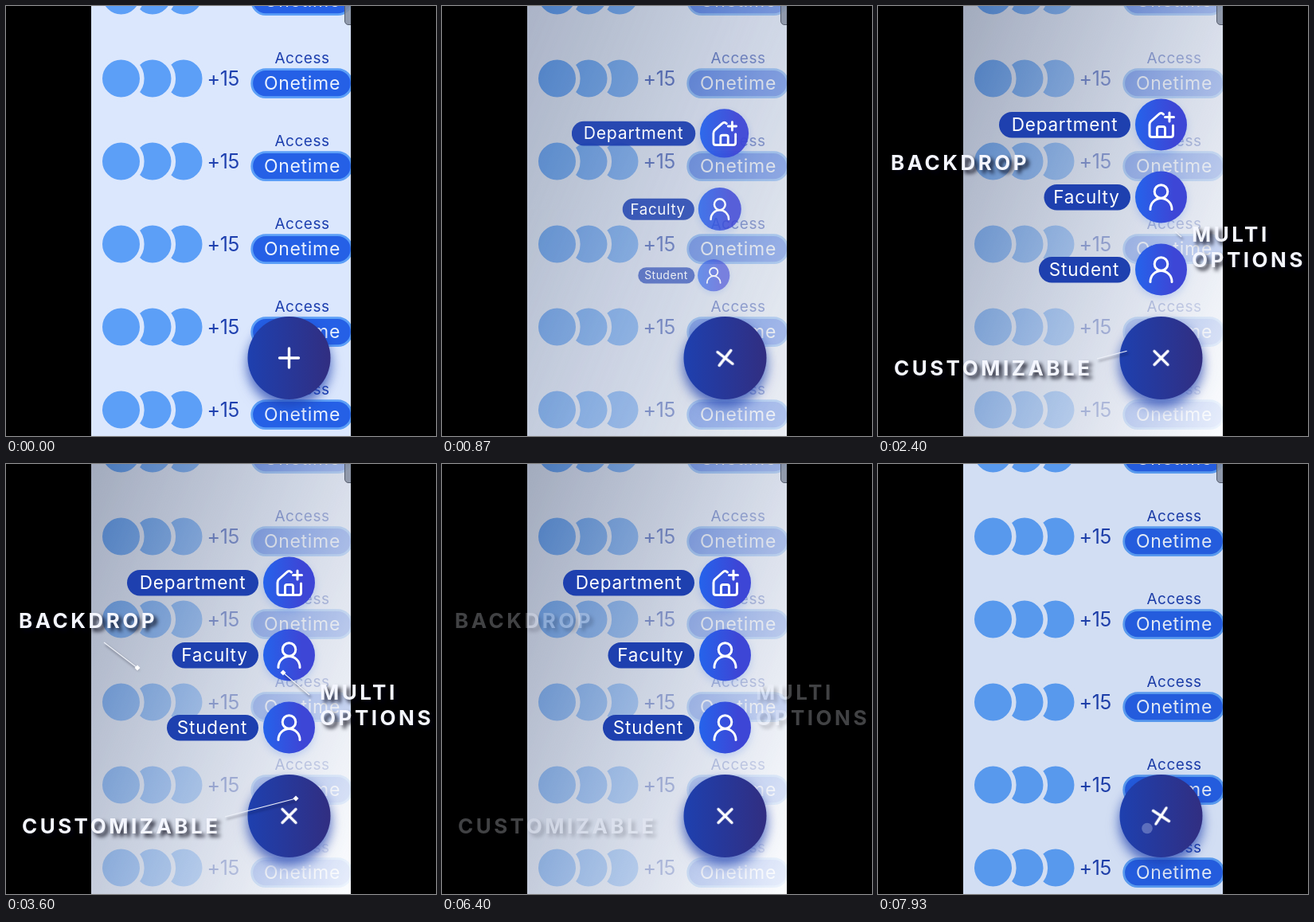
Recreate the animation shown at these times as an HTML page. Size 540 px wide and 540 px high, loop 8 s.

```html
<!DOCTYPE html>
<html lang="en">
<head>
<meta charset="utf-8">
<title>Floating action menu</title>
<style>
html, body { margin: 0; width: 100%; height: 100%; overflow: hidden; background: #000; }
.stage { position: relative; width: 540px; height: 540px; overflow: hidden; background: #000; }
.stage > svg { position: absolute; left: 0; top: 0; display: block; }
.shade { position: absolute; left: 107px; top: 0; width: 326px; height: 540px; }
.blend { background: linear-gradient(112deg, rgba(10,10,20,.27), rgba(198,202,212,.62) 50%, rgba(255,255,255,.9)); }
.dim { background: #000; }

text { font-family: Inter, "Open Sans", sans-serif; }
.ink { fill: #1e40af; }
.count { font-size: 25px; letter-spacing: -.3px; }
.access { font-size: 19px; letter-spacing: .5px; }
.once { font-size: 23px; letter-spacing: .7px; fill: #eaf2ff; }
.tag text { font-size: 22.5px; letter-spacing: .8px; fill: #fff; }
.tag rect { fill: #1e40af; }
.icon { fill: none; stroke: #fff; stroke-width: 3; stroke-linecap: round; stroke-linejoin: round; }
.disc { filter: drop-shadow(0 4px 5px rgba(37,99,235,.2)); }
.fab { filter: drop-shadow(0 9px 7px rgba(30,64,175,.65)) drop-shadow(0 4px 7px rgba(30,64,175,.2)); }
.note { font-size: 26px; font-weight: 700; letter-spacing: 3.5px; fill: #f4f6ff;
  filter: drop-shadow(4px 4px 2.5px rgba(0,0,15,.85)); }
.line { stroke: #eef1f8; stroke-width: 1.1; fill: none; stroke-dasharray: 1 2;
  filter: drop-shadow(2px 3px 1.5px rgba(0,0,15,.5)); }
.tip { fill: #fff; transform-box: fill-box; transform-origin: center; }

.blend, .dim, .item, .cross, .dot, .note, .line, .tip { animation: 8s linear infinite; }
.blend { animation-name: blend; }
.dim { animation-name: dim; }
.cross { animation-name: spin; transform-origin: 355.5px 442px; }
.dot { animation-name: tap; }
.note { animation-name: note; }
.dept { animation-name: dept; transform-origin: 339px 336px; }
.fac { animation-name: fac; transform-origin: 316px 329px; }
.stu { animation-name: stu; transform-origin: 318px 350px; }
.l1 { animation-name: draw1; }
.l2 { animation-name: draw2; }
.l3 { animation-name: draw3; }
.t1 { animation-name: tip1; }
.t2 { animation-name: tip2; }
.t3 { animation-name: tip3; }

@keyframes blend {
  0%, 5.75% { opacity: 0; }
  8.375% { opacity: .35; }
  12.5%, 82% { opacity: 1; }
  85.5%, 100% { opacity: 0; }
}
@keyframes dim {
  0%, 4.125% { opacity: 0; }
  5.75% { opacity: .04; }
  8.375% { opacity: .09; }
  12.5%, 82% { opacity: 0; }
  84% { opacity: .09; }
  85.875% { opacity: .06; }
  89.4%, 97.5% { opacity: 0; }
  99.125% { opacity: .04; }
  100% { opacity: .06; }
}
@keyframes spin {
  0% { transform: rotate(0deg); }
  4.125% { transform: rotate(0deg); animation-timing-function: ease; }
  13.6% { transform: rotate(135deg); }
  82.1% { transform: rotate(135deg); animation-timing-function: ease; }
  91.6% { transform: rotate(0deg); }
  97.5% { transform: rotate(0deg); animation-timing-function: cubic-bezier(.4,.2,.8,.8); }
  100% { transform: rotate(56deg); }
}
@keyframes tap {
  0%, 2.9% { opacity: 0; }
  3.75%, 6% { opacity: .3; }
  7.5%, 96.3% { opacity: 0; }
  97.2%, 99.4% { opacity: .3; }
  100% { opacity: .22; }
}
@keyframes dept {
  0%, 6.5% { transform: scale(0); opacity: 0; animation-timing-function: ease; }
  12.75%, 81.6% { transform: scale(1); opacity: 1; animation-timing-function: ease; }
  85.4%, 100% { transform: scale(0); opacity: 0; }
}
@keyframes fac {
  0%, 7.6% { transform: scale(0); opacity: 0; animation-timing-function: ease; }
  13.8%, 81.2% { transform: scale(1); opacity: 1; animation-timing-function: ease; }
  85%, 100% { transform: scale(0); opacity: 0; }
}
@keyframes stu {
  0%, 8.7% { transform: scale(0); opacity: 0; animation-timing-function: ease; }
  14.8%, 80.8% { transform: scale(1); opacity: 1; animation-timing-function: ease; }
  84.6%, 100% { transform: scale(0); opacity: 0; }
}
@keyframes note {
  0%, 22.6% { opacity: 0; }
  27.5%, 76% { opacity: 1; }
  81.5%, 100% { opacity: 0; }
}
@keyframes draw1 {
  0%, 27% { stroke-dashoffset: 1; opacity: 0; }
  27.1% { stroke-dashoffset: 1; opacity: 1; }
  34%, 73.6% { stroke-dashoffset: 0; opacity: 1; }
  78.5% { stroke-dashoffset: 1; opacity: 1; }
  78.6%, 100% { stroke-dashoffset: 1; opacity: 0; }
}
@keyframes draw2 {
  0%, 28.2% { stroke-dashoffset: 1; opacity: 0; }
  28.3% { stroke-dashoffset: 1; opacity: 1; }
  35.5%, 73.6% { stroke-dashoffset: 0; opacity: 1; }
  78.5% { stroke-dashoffset: 1; opacity: 1; }
  78.6%, 100% { stroke-dashoffset: 1; opacity: 0; }
}
@keyframes draw3 {
  0%, 30.2% { stroke-dashoffset: 1; opacity: 0; }
  30.3% { stroke-dashoffset: 1; opacity: 1; }
  37.5%, 73.6% { stroke-dashoffset: 0; opacity: 1; }
  78.5% { stroke-dashoffset: 1; opacity: 1; }
  78.6%, 100% { stroke-dashoffset: 1; opacity: 0; }
}
@keyframes tip1 { 0%, 33.5% { transform: scale(0); } 35.5%, 73% { transform: scale(1); } 74.5%, 100% { transform: scale(0); } }
@keyframes tip2 { 0%, 35% { transform: scale(0); } 37%, 73% { transform: scale(1); } 74.5%, 100% { transform: scale(0); } }
@keyframes tip3 { 0%, 37% { transform: scale(0); } 39%, 73% { transform: scale(1); } 74.5%, 100% { transform: scale(0); } }
</style>
</head>
<body>
<div class="stage">
  <svg width="540" height="540" viewBox="0 0 540 540">
    <defs>
      <clipPath id="screen"><rect x="107" width="326" height="540"/></clipPath>
      <g id="row">
        <g fill="#5c9ff7" stroke="#dbe7fd" stroke-width="5.6">
          <circle cx="223" r="26.3"/>
          <circle cx="184" r="26.3"/>
          <circle cx="144.5" r="26.3"/>
        </g>
        <text class="ink count" x="252.5" y="8.5">+15</text>
        <text class="ink access" x="372" y="-19" text-anchor="middle">Access</text>
        <rect x="308.7" y="-11.3" width="125.5" height="35" rx="17.5" fill="#2560e6" stroke="#5c9ff7" stroke-width="2.8"/>
        <text class="once" x="372" y="14" text-anchor="middle">Onetime</text>
      </g>
    </defs>
    <g clip-path="url(#screen)">
      <rect x="107" width="326" height="540" fill="#dbe7fd"/>
      <use href="#row" y="-13"/>
      <use href="#row" y="91"/>
      <use href="#row" y="195"/>
      <use href="#row" y="299"/>
      <use href="#row" y="403"/>
      <use href="#row" y="507"/>
    </g>
  </svg>

  <div class="shade blend"></div>
  <div class="shade dim"></div>

  <svg width="540" height="540" viewBox="0 0 540 540">
    <defs>
      <linearGradient id="deep"><stop stop-color="#1e40af"/><stop offset="1" stop-color="#312e81"/></linearGradient>
      <linearGradient id="bright"><stop stop-color="#2563eb"/><stop offset=".75" stop-color="#3d46d6"/></linearGradient>
      <g id="person" class="icon">
        <circle cy="-7" r="8.3"/>
        <path d="M-13.5 15.5V15a13.5 13.5 0 0 1 27 0v.5"/>
      </g>
      <g id="house" class="icon">
        <path d="M3-13Q0-16-3-13L-13-4Q-14.5-2.5-14.5 0V12.5Q-14.5 15.5-11.5 15.5H12Q15 15.5 15 12.5V1"/>
        <path d="M-5 15V5Q-5 2.5-2.5 2.5H2.5Q5 2.5 5 5V15M10.5-15V-4M5-9.5H16"/>
      </g>
    </defs>

    <rect clip-path="url(#screen)" x="425.5" y="-10" width="14" height="33.5" rx="4.5" fill="#848d9f" fill-opacity=".85" stroke="#565e6e"/>

    <g class="item stu">
      <g class="tag"><rect x="202" y="315" width="115" height="32.5" rx="16.2"/><text x="259" y="339" text-anchor="middle">Student</text></g>
      <circle class="disc" cx="355.5" cy="331" r="32.5" fill="url(#bright)"/>
      <use href="#person" x="355.5" y="331"/>
    </g>
    <g class="item fac">
      <g class="tag"><rect x="208.5" y="224" width="108.5" height="32.5" rx="16.2"/><text x="262" y="248" text-anchor="middle">Faculty</text></g>
      <circle class="disc" cx="355.5" cy="240" r="32.5" fill="url(#bright)"/>
      <use href="#person" x="355.5" y="240"/>
    </g>
    <g class="item dept">
      <g class="tag"><rect x="152" y="133" width="165" height="32.5" rx="16.2"/><text x="234.5" y="157" text-anchor="middle">Department</text></g>
      <circle class="disc" cx="355.5" cy="149" r="32.5" fill="url(#bright)"/>
      <use href="#house" x="355.5" y="149"/>
    </g>

    <circle class="fab" cx="355.5" cy="442" r="52" fill="url(#deep)"/>
    <path class="cross" d="M343.5 442h24M355.5 430v24" stroke="#fff" stroke-width="3.4" stroke-linecap="round"/>
    <circle class="dot" cx="338" cy="457.5" r="6.8" fill="#dfe8ff"/>

    <text class="note" x="16" y="206">BACKDROP</text>
    <text class="note" x="394" y="296">MULTI</text>
    <text class="note" x="394" y="328">OPTIONS</text>
    <text class="note" x="20" y="464">CUSTOMIZABLE</text>

    <path class="line l1" pathLength="1" d="M275 443L364 420"/>
    <path class="line l2" pathLength="1" d="M381 290L348 262"/>
    <path class="line l3" pathLength="1" d="M123 224L165 256"/>
    <path class="tip t1" d="M364 416.5l3.5 3.5-3.5 3.5-3.5-3.5z"/>
    <path class="tip t2" d="M348 258.5l3.5 3.5-3.5 3.5-3.5-3.5z"/>
    <path class="tip t3" d="M165 252.5l3.5 3.5-3.5 3.5-3.5-3.5z"/>
  </svg>
</div>
</body>
</html>
```
